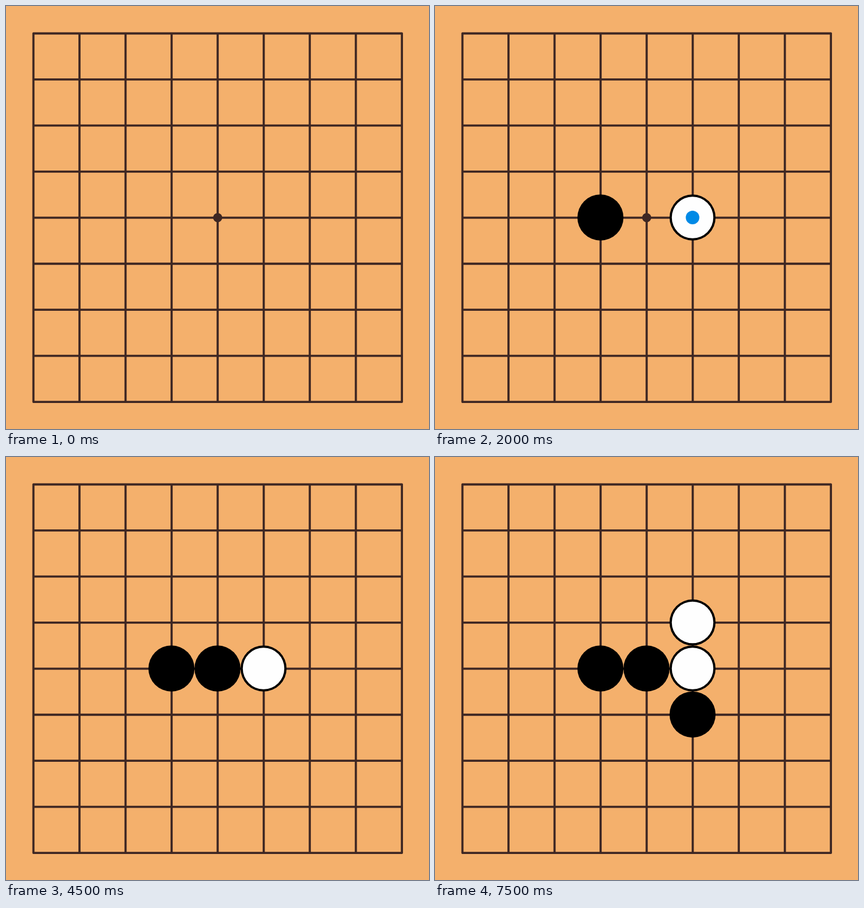
Recreate the animation shown at these times as an HTML page with a canvas. Size 748 by 748 pixels, loop 8000 ms.

```html
<!DOCTYPE html>
<html lang="en">
<head>
<meta charset="utf-8">
<title>Board opening</title>
<style>
  html, body { margin: 0; width: 100%; height: 100%; overflow: hidden; background: #f4b06c; }
  canvas { display: block; }
</style>
</head>
<body>
<canvas id="board" width="748" height="748"></canvas>
<script>
const ctx = document.getElementById('board').getContext('2d');
const SIZE = 748, LOOP = 8000, CELL = 81.45, CENTER = 374;
const LINE_CENTER = 374.3, LINE_WIDTH = 3.8;
const FIRST_MOVE = 500, MOVE_GAP = 1500, MARK_TIME = 1000;

// Column and row offsets from the centre point; black plays first.
const moves = [[-1, 0], [1, 0], [0, 0], [1, -1], [1, 1]];
const isBlack = [true, false, true, false, true];

function disc(x, y, radius, color) {
  ctx.fillStyle = color;
  ctx.beginPath();
  ctx.arc(x, y, radius, 0, Math.PI * 2);
  ctx.fill();
}

function drawBoard() {
  ctx.fillStyle = '#f4b06c';
  ctx.fillRect(0, 0, SIZE, SIZE);
  ctx.strokeStyle = '#3e2723';
  ctx.lineWidth = LINE_WIDTH;
  ctx.lineCap = 'round';
  ctx.beginPath();
  const low = LINE_CENTER - 4 * CELL, high = LINE_CENTER + 4 * CELL;
  for (let i = -4; i <= 4; i++) {
    const p = LINE_CENTER + i * CELL;
    ctx.moveTo(low, p);
    ctx.lineTo(high, p);
    ctx.moveTo(p, low);
    ctx.lineTo(p, high);
  }
  ctx.stroke();
  disc(LINE_CENTER, LINE_CENTER, 8.1, '#3e2723');
}

function drawMove(index, time) {
  const age = time - FIRST_MOVE - index * MOVE_GAP;
  if (age < 0) return;
  const [x, y] = moves[index].map(n => CENTER + n * CELL);
  disc(x, y, CELL / 2, '#000');
  if (!isBlack[index]) disc(x, y, CELL / 2 - 4, '#fefefe');
  if (age < MARK_TIME) disc(x, y, 12, '#008ae6');
}

function render(now) {
  const time = now % LOOP;
  drawBoard();
  moves.forEach((_, index) => drawMove(index, time));
}

const start = performance.now();
function tick() {
  render(performance.now() - start);
  requestAnimationFrame(tick);
}
tick();
</script>
</body>
</html>
```
